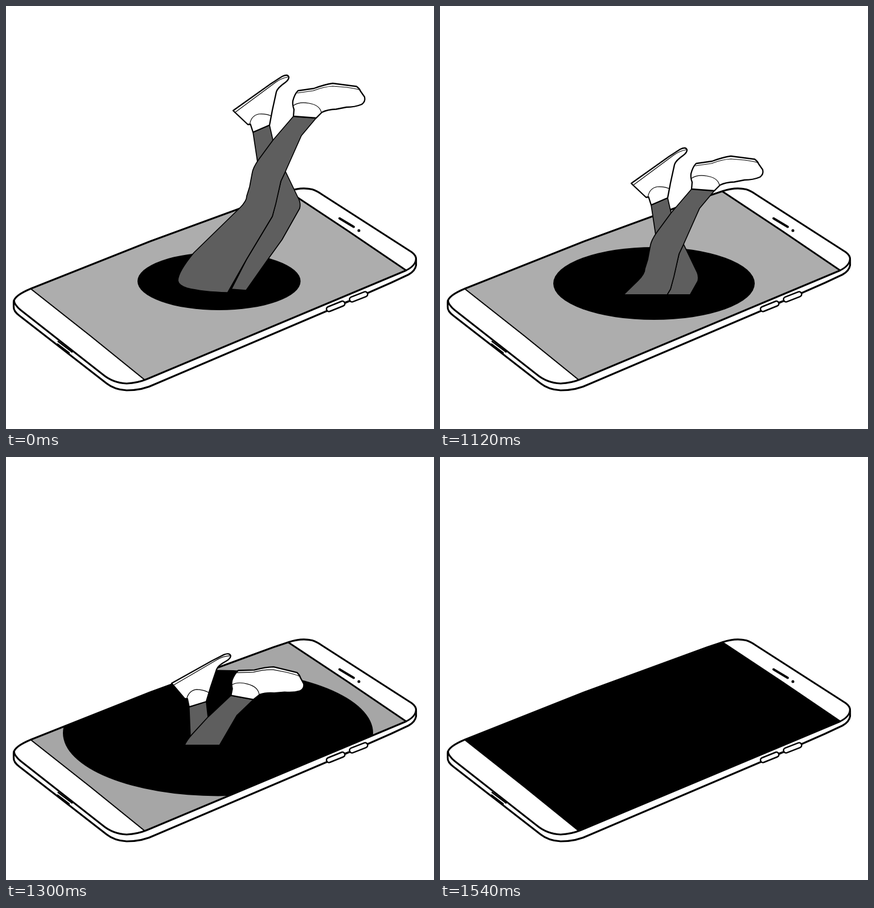
Recreate the animation shown at these times as an HTML page with a canvas. Size 752x744 px, loop 1600 ms.

```html
<!DOCTYPE html>
<html lang="en">
<head>
<meta charset="utf-8">
<title>Falling into the phone</title>
<style>
  html, body { margin: 0; width: 100%; height: 100%; overflow: hidden; background: #fff; }
  canvas { display: block; }
</style>
</head>
<body>
<canvas id="stage" width="752" height="744"></canvas>
<script>
const ctx = document.getElementById('stage').getContext('2d');
const LOOP = 1600, HOLD = 1000, STEP = 60;
const INK = '#000', CLOTH = '#5e5e5e';
const HEEL = [399, 184];
const TILT = 6.2 * Math.PI / 180;

// hole: cx, cy, rx, ry; heel: where the back heel sits; floor: where the legs are cut off
const pose = (hole, heel, floor, tilt = 0) => ({ hole, heel, floor, tilt });
const rest = pose([374.3, 484, 143.3, 51], HEEL, 744);
const steps = [
  pose([374.5, 483, 144, 52.5], [374, 242], 504),
  pose([375, 485, 160, 58], [355, 277], 505),
  pose([376, 488, 177, 64], [336, 312], 507),
  pose([380, 489, 206, 79], [317, 335], 506),
  pose([384, 490, 236, 95.5], [298, 358], 506),
  pose([372.5, 485.5, 272.5, 111], [291, 398], 506, TILT),
  pose([369, 481, 286, 130], [274, 446.5], 505, TILT),
  pose([365.8, 476.5, 300.5, 150], [257, 495], 505, TILT),
  pose([365.8, 483, 300.5, 185], [240, 543.5], 505, TILT),
  pose(null, null, 0)
];

const path = d => new Path2D(d);

const phone = {
  body: path('M44 497 L253 414 L470 334.500 L497 325.500 Q519 318 538 322.500 Q546 325 556 332 L713 433 Q721 439 720.500 446 L720.500 456 Q719 466 707 472.500 L676 487 L560 538 L262 665 Q240 676 212 676 Q191 675 177 664 L24 545 Q13 537 13.500 529 L13.500 520 Q15 509 44 497 Z'),
  rim: path('M14 518 Q15 526 26 535 L170 648 Q188 663 212 664 Q231 663 247 656.500 L702 465.500 Q720 457 720.500 444'),
  screen: path('M44 497 L253 414 L497 326 L702 465.500 L243 657 Z'),
  leftBar: path('M43 497 L148 580 L243 657'),
  rightBar: path('M496 326 L600 395 L703 465'),
  speaker: path('M586 373.500 L611 388.500'),
  port: path('M91.500 590 L116 608.500 M90.500 594.500 L111 610'),
  buttons: path('M567.500 533 L591 523.500 M608 516 L631 507'),
  joint: path('M595 521.500 L604 518.500')
};

const legs = {
  backThigh: path('M483 308 L491 291 L515 341 Q518 348 516 356 L485 411 L462 443 L422 500 L396 498 L423 445 L468 370 Z'),
  backShin: path('M434 222 L463 209.500 L469 236 L480 290 L442 275 Z'),
  backShoe: path('M399 184 L465 137 L485 124 Q495 119 497 125 Q497 130 490 135 Q477 144 475 151 L468 183 L463 209.500 L434 222 L429.500 208 L425 208.500 Z'),
  backDetail: path('M402 187.500 L474 134 Q484 127 495 125 M428.500 207 Q431 193 444 190 Q456 189 465 193'),
  frontLeg: path('M505 194 L469 236 L444 270 Q434 284 432.500 294 L428 318 L423 334 Q423 343 411 355 L330 434 Q302 468 302 483 Q303 491 318 496 Q346 503 389.500 504 L423 445 L468 370 L474 348 L483 308 L491 291 L519 228 L545 197 Z'),
  frontShoe: path('M513 149 L541 145 Q560 138 574 136 L616 141.500 Q621 145 623 150 L630 160 Q632 168 625 173 Q613 178 598 178 L580 181.500 Q565 182 555 187 L545 197 L505 194 L506 182 Q503 174 504 167 Q507 155 513 149 Z'),
  frontDetail: path('M512 153 L540 149 Q558 142 574 141 L598 143 Q612 145 620 147 M505 175 Q515 168 532 171 Q551 174 554 187')
};

function line(shape, width, color = INK) {
  ctx.lineWidth = width;
  ctx.strokeStyle = color;
  ctx.stroke(shape);
}

function fill(shape, color) {
  ctx.fillStyle = color;
  ctx.fill(shape);
}

function part(shape, color, width) {
  fill(shape, color);
  line(shape, width);
}

function drawPhone(hole, screenColor) {
  fill(phone.body, '#fff');
  fill(phone.screen, hole ? screenColor : INK);
  if (hole) {
    const [cx, cy, rx, ry] = hole;
    ctx.save();
    ctx.clip(phone.screen);
    ctx.beginPath();
    ctx.ellipse(cx, cy, rx, ry, 0, 0, Math.PI * 2);
    ctx.fillStyle = INK;
    ctx.fill();
    ctx.restore();
  }
  line(phone.body, 3.2);
  line(phone.rim, 3);
  line(phone.leftBar, 2.2);
  line(phone.rightBar, 3);
  line(phone.speaker, 4);
  line(phone.port, 2.2);
  line(phone.buttons, 11.4);
  line(phone.buttons, 6.2, '#fff');
  line(phone.joint, 2.6);
  ctx.beginPath();
  ctx.arc(620, 395, 2.5, 0, Math.PI * 2);
  ctx.fillStyle = INK;
  ctx.fill();
}

function drawLegs({ heel, floor, tilt }) {
  ctx.save();
  ctx.beginPath();
  ctx.rect(0, 0, 752, floor);
  ctx.clip();
  ctx.translate(heel[0], heel[1]);
  ctx.rotate(tilt);
  ctx.translate(-HEEL[0], -HEEL[1]);
  part(legs.backThigh, CLOTH, 1.7);
  part(legs.backShin, CLOTH, 1.7);
  part(legs.backShoe, '#fff', 2.3);
  line(legs.backDetail, 1.2);
  part(legs.frontLeg, CLOTH, 1.7);
  part(legs.frontShoe, '#fff', 2.3);
  line(legs.frontDetail, 1.2);
  ctx.restore();
}

function draw() {
  const t = performance.now() % LOOP;
  const now = t < HOLD ? rest : steps[Math.floor((t - HOLD) / STEP)];
  ctx.fillStyle = '#fff';
  ctx.fillRect(0, 0, 752, 744);
  ctx.lineJoin = ctx.lineCap = 'round';
  drawPhone(now.hole, t < HOLD + 4 * STEP ? '#adadad' : '#a6a6a6');
  if (now.heel) drawLegs(now);
  requestAnimationFrame(draw);
}
draw();
</script>
</body>
</html>
```
